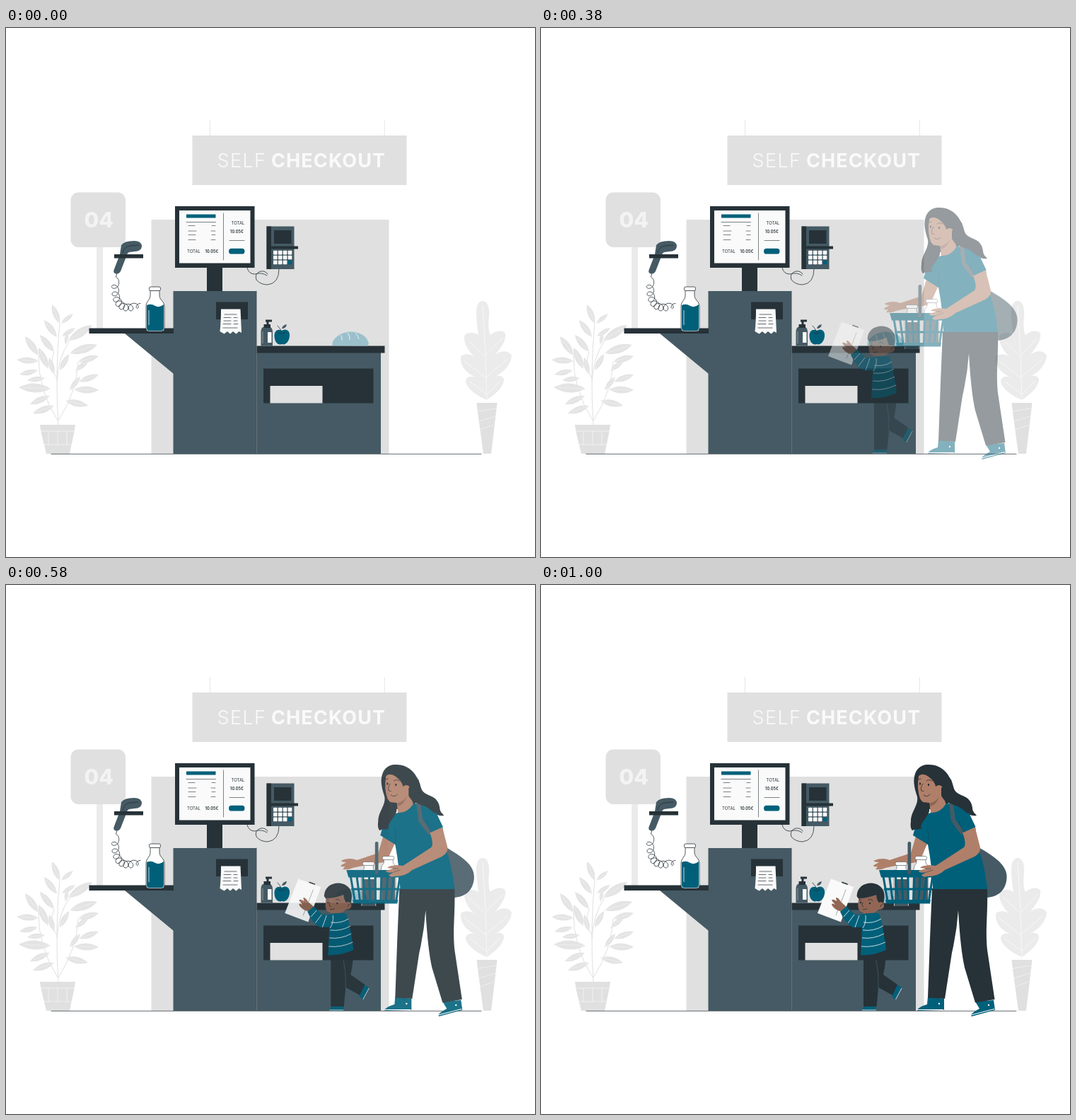
An HTML page that plays this animation: 748x748 px, repeating every 1.04 s.

```html
<!DOCTYPE html>
<html lang="en">
<head>
<meta charset="utf-8">
<title>Self checkout</title>
<style>
html, body { margin: 0; width: 100%; height: 100%; overflow: hidden; background: #fff; }
svg { display: block; width: 100vw; height: 100vh; }
text { font-family: Inter, "Open Sans", sans-serif; }
.dark { fill: #263238; }
.slate { fill: #455a64; }
.teal { fill: #00607a; }
.grey { fill: #e0e0e0; }
.pale { fill: #ebebeb; }
.leaf { fill: #e4e4e4; }
.white { fill: #fafafa; }
.skin { fill: #b07f69; }
.skin2 { fill: #916654; }
.line { fill: none; stroke: #263238; stroke-width: .8; stroke-linecap: round; }
.light { fill: none; stroke: #fafafa; stroke-width: .8; }
.outlined { fill: #fff; stroke: #263238; stroke-width: .8; }
.thick { fill: none; stroke: #00607a; stroke-width: 3; }
</style>
</head>
<body>
<svg viewBox="0 0 748 748">
  <!-- wall, hanging sign, lane sign -->
  <g class="grey">
    <rect x="205.5" y="271" width="336" height="331"/>
    <rect x="263.5" y="152" width="303" height="70"/>
    <path d="M288.2 130h.8v22h-.8zM534.8 130h.8v22h-.8z"/>
    <rect class="pale" x="128" y="309" width="9" height="116"/>
    <rect x="91.5" y="232.5" width="77.500" height="77.500" rx="11"/>
  </g>
  <g class="white">
    <text x="298.500" y="197" font-size="27" font-weight="300" letter-spacing="1.4">SELF</text>
    <text x="375" y="197" font-size="27" font-weight="700" letter-spacing="1.1">CHECKOUT</text>
    <text x="110.500" y="281.500" font-size="30" font-weight="800" opacity=".75">04</text>
  </g>

  <!-- plants -->
  <g id="bush"></g>
  <path class="grey" d="M48 561H98L96.500 571 90 602H57L49.500 571Z"/>
  <path class="light" d="M49 570H97M51 589H93M60 570v19M73 570v19M86 570v19" opacity=".8"/>
  <path class="pale" d="M674 386C681 386 684 395 683 407 682 420 682 428 685 434 691 428 703 426 706 432 708 443 697 455 692 462 700 455 711 456 715 463 714 477 703 487 692 493 698 490 705 493 704 499 701 511 690 519 680 526 668 521 653 512 650 500 650 493 658 491 665 494 652 489 642 479 643 465 646 460 656 460 663 465 655 459 647 447 648 435 653 429 664 431 668 434 666 422 665 410 665 401 665 393 668 386 674 386Z"/>
  <path class="light" d="M674 392Q679 460 680 530M679 462 702 438M677 464 653 441M680 493 709 468M679 495 648 471M680 518 698 500M680 518 656 500" stroke-width=".6"/>
  <path class="grey" d="M665.500 530H694.500L693 543 686 602H675L667 543Z"/>
  <path class="light" d="M667 542 693 538M669 556 692 549M670 568 690 561" opacity=".7"/>

  <path class="line" d="M64 602.400H672" style="stroke-width:.7"/>

  <!-- kiosk -->
  <rect class="slate" x="236.500" y="372" width="117.500" height="230"/>
  <path class="slate" d="M168 432H237V489Z"/>
  <rect class="dark" x="117.500" y="424.500" width="119.500" height="7.500"/>
  <path class="dark" d="M284 338h22v34h-22zM239 252h112.500v87H239z"/>
  <rect class="white" x="245" y="258" width="100.500" height="74.500"/>
  <rect class="teal" x="255" y="263.500" width="41.500" height="5"/>
  <rect class="teal" x="315" y="311.800" width="22.500" height="7.800" rx="3.900"/>
  <path class="line" d="M307.500 262V328M255 274.500H296.500M316 300.500H337M258 279.500h9M258 287h11M258 292.500h10M258 299.500h10M291 279.500h5M290 287h6M291 292.500h5M290 299.500h6" style="stroke-width:.6"/>
  <g class="dark" font-size="6">
    <text x="256" y="318">TOTAL</text>
    <text x="318.500" y="277.500">TOTAL</text>
    <g font-weight="600" font-size="5.700">
      <text x="281.500" y="318">10.05€</text>
      <text x="317" y="290">10.05€</text>
    </g>
  </g>
  <rect class="dark" x="297" y="387.500" width="45" height="24.500"/>
  <path class="white" d="M304 397.500H331.500L333 431 329.500 429 325.500 432.500 321 429 317 432.500 313 429 308.500 432.500 302.500 429Q304 415 304 397.500Z"/>
  <path class="line" d="M309 405H326M308 409.500H318M322 409.500h5M308 414H318M322 414h5M307 418.500H318M322 418.500h6M307 424H327" style="stroke-width:.7"/>

  <!-- counter -->
  <rect class="slate" x="354.500" y="459" width="175.500" height="143"/>
  <path class="line" d="M354.300 372V602" style="stroke-width:.5"/>
  <path class="dark" d="M354.500 449.500h181v10h-181zM364 481.500h155.500v49H364z"/>
  <rect class="grey" x="373.500" y="506" width="74" height="24.500"/>

  <!-- scanner -->
  <path id="coil" class="line"/>
  <path class="slate" d="M163 307Q167 301 181 301 192 301 192 309 191 316 182 316L174 317Q171 318 169 326L162 344Q159 349 154 347 151 345 153 341L161 320Z"/>
  <path class="line" d="M165 318Q167 309 175 308L187 307"/>
  <rect class="dark" x="153" y="320" width="41" height="5.500"/>

  <!-- milk bottle -->
  <path class="outlined" d="M204 371H217V378C217 385 224 386 224 394V425Q224 429 220 429H202Q198 429 198 425V394C198 386 204 385 204 378Z"/>
  <path class="teal" d="M199 392Q205 389 211 393 217 396 223 391V424Q223 428 219.500 428H202.500Q199 428 199 424Z"/>
  <rect class="outlined" x="202.500" y="366" width="16" height="5.500" rx="2"/>
  <path class="light" d="M202 399V420"/>

  <!-- card reader -->
  <path class="line" d="M341 339Q343 348 352 348 362 345 369 350M370 348Q367 343 360 344 351 347 354 356 360 363 370 363 386 361 386 341"/>
  <rect class="slate" x="368.500" y="280.500" width="39" height="60.500"/>
  <path class="dark" d="M368.500 280.500h6.500v60.500h-6.500zM379 286h24.500v19H379zM370 308.500h43v4h-43z"/>
  <g id="keys" class="white"></g>

  <!-- goods -->
  <path class="slate" d="M363 423H374Q377 425 377 430V449.500H360.500V430Q360.500 425 363 423Z"/>
  <path class="dark" d="M367 412.500H376V415.500H371.500V419H374V424H364.500V419H368.500V415.500H367Z"/>
  <path class="white" d="M370 430h5.500v15H370z"/>
  <path class="light" d="M363 429V446" opacity=".5"/>
  <path class="teal" d="M390 428C396 424 402 428 401 436 400 444 395 449 390 447 385 449 380 445 379.500 436 379 428 385 425 390 428Z"/>
  <path class="slate" d="M390 425Q391 420 397 419 396 425 390 425Z"/>
  <path class="line" d="M390 430Q388 425 384 421M385 431Q390 434 395 430"/>
  <path d="M461.500 449C460 442 468 434 478 431 490 427 503 431 509 438 514 445 514 449 509 449.500Z" fill="#9bc0cc"/>
  <path class="light" d="M473 434Q476 438 475 442M483 431Q487 436 486 441M494 431Q498 435 499 440"/>

  <g id="people">
    <!-- woman: bag, far arm, head -->
    <path class="slate" d="M619 371C641 384 660 396 658.500 415 657 433 645 441 630 442L622 420Z"/>
    <path class="skin" d="M531 352 523 379 493 389Q483 385 471 389.500 470 391.500 478 392L470 396.500Q470 399 476 398L473 402Q481 403 487 400L496 398 531 392Q536 390 539 382L548 362Z"/>
    <path class="dark" d="M547 254C560 253 572 261 577 271 584 280 582 290 590 300L570 312 545 318 533 302C529 291 525 278 529 267 532 258 539 254 547 254Z"/>
    <path class="skin" d="M549 304 551 324Q564 325 573 311L565 288Z"/>
    <path class="skin" d="M534 270Q531 288 536 302 540 311 550 308.500 559 307 563 298 570 293 567 285 563 281 558 285 557 278 548 271 540 265 534 270Z"/>
    <path d="M550 308.500Q558 307 563 299 560 310 551 313Z" fill="#8f6453"/>
    <path class="line" d="M540 281Q536 287 538 291L541 291.500M541 297Q546 301 550 296M533 275 537 274M545 277Q549 274 553 277"/>
    <g class="dark"><ellipse cx="536" cy="281" rx="1.200" ry="1.700"/><ellipse cx="548" cy="282.500" rx="1.200" ry="1.700"/></g>

    <!-- shoes, trousers -->
    <path class="teal" d="M547 582 570 585V601L532 602Q532 597 546 593ZM614 589 640 587 642 601 609 610Q605 607 620 599Z"/>
    <path class="light" d="M532 600.500H569M608 608 641 599.500" style="stroke-width:1.200"/>
    <g class="white"><circle cx="563" cy="592" r="1.200"/><circle cx="633" cy="594" r="1.200"/></g>
    <path class="dark" d="M553 429H631C632 465 628 490 631 516L641.500 586 614 590.500 599 541Q593 515 590 460 588 490 581 520L571 585 547 583.500 550 500Z"/>

    <!-- shirt, strap, loose hair -->
    <path class="teal" d="M551 322Q564 323 573 309C590 309 601 315 605 323L614 342 618 371Q628 398 631 430H554Q553 398 547 367L526 354Q532 330 539 326Z"/>
    <path class="slate" d="M577 309 583 310 586 332 600 350 594 353 580 334Z"/>
    <path class="line" d="M598 350Q592 341 591 334M547 366Q549 355 547 345" style="stroke-width:.4"/>
    <path class="dark" d="M532 299C534 312 523 320 523 334 522 341 523 345 525 347 530 344 534 347 538 344 535 337 546 330 549 320L549 308 540 307ZM566 287 580 275C582 286 584 293 594 297 606 301 609 308 610 315 610 321 614 323 616 326 606 328 600 320 593 315 584 309 573 311 566 298Z"/>

    <!-- bottles and basket -->
    <g id="flask">
      <path class="outlined" d="M531 388H544V393Q548 397 548 402V446H527V402Q527 397 531 393Z" style="stroke-width:.5"/>
      <path class="slate" d="M528 408H547V446H528Z"/>
      <rect class="outlined" x="529" y="383.500" width="16.500" height="5" rx="2" style="stroke-width:.5"/>
    </g>
    <use href="#flask" x="-28" y="8"/>
    <path class="teal" d="M478 403H556.500L555.500 413.500H481Z"/>
    <path id="bars" class="thick"/>
    <path class="teal" d="M487 445H551L550 450.500H488Z"/>
    <rect class="slate" x="518.500" y="363" width="4.700" height="46" rx="2"/>

    <!-- near arm -->
    <path class="skin" d="M596 350 613.500 342 621 371Q622 379 613 384L571 403Q562 412 546 412 540 414 538 410L545 406Q534 408 534 404L544 401 536 400Q537 397 549 396L558 397 598 371Q602 366 596 350Z"/>
    <path class="teal" d="M593 325 605 322 614.500 342 597 350Z"/>
    <path class="line" d="M545 406 554 403M544 401H551" style="stroke-width:.5"/>

    <!-- child -->
    <path class="skin2" d="M456 459H472V470H456Z"/>
    <path class="teal" d="M454 602Q454 597 459 595H474V602ZM503 565 510 569 501 586.500 496 581Z"/>
    <path class="light" d="M454 601H474M510 570 501.500 586"/>
    <path class="dark" d="M456 520 487.500 515Q488 535 484 551L504 565 497 580 477 569 474.500 596H456Z"/>
    <path class="line" d="M474 531Q478 550 477 569" style="stroke:#455a64"/>
    <path class="white" d="M410 415.500 442 427 424 476.500 391 464Z"/>
    <path class="line" d="M426 420.500 433 423" style="stroke-width:1.800"/>
    <path class="line" d="M431 431 417 467" style="stroke-width:.4"/>
    <path class="skin2" d="M425 462Q414 459 411 452 411 449 416 452L411 446Q412 443 418 447L417 442Q420 441 424 448L433 456Z"/>
    <path class="teal" d="M453 466Q466 461 478 465 483 478 488 516 471 524 452 523.500L454 484 441 484Q430 479 423 462L432 454.500 444 466Z"/>
    <path class="light" d="M428 469 436 460M434 478 443 466M444 484 450 467M455 485Q460 478 459 467M456 477Q470 479 481 472M455 488Q470 490 484 482M454 499Q470 501 485 493M453 511Q470 513 487 505"/>
    <path class="dark" d="M446.500 440C447 427 457 421 468 421.500 482 423 488 434 485 446 484 454 481 457 477 459L452 448Z"/>
    <path class="skin2" d="M449.500 443Q447 454 450 460 454 465 465 464 473 464 477 459 486 459 485 451 482 447 478 449 475 447 474 438 461 443 449.500 443Z"/>
    <path class="line" d="M455 449Q452 454 456 455M455 459 461 458M450 445 453 445M463 445Q466 443 469 446M480 455Q481 451 483 451"/>
    <g class="dark"><circle cx="452" cy="449" r="1.200"/><circle cx="465" cy="450" r="1.200"/></g>
  </g>
</svg>
<script>
const $ = id => document.getElementById(id);

// Bush: a stem, then leaves as base x, y and tip x, y
const leaves = [
  [76,418,65,391], [78,418,95,404], [72,437,54,413], [79,436,98,424], [88,442,122,420],
  [68,458,48,434], [90,460,129,448], [84,448,87,430], [46,463,27,436], [46,471,15,469],
  [102,472,131,464], [45,484,19,490], [55,495,30,498], [98,485,117,470], [103,500,131,490],
  [63,510,18,508], [90,512,105,493], [96,511,131,512], [62,520,34,532], [68,534,38,545],
  [84,527,116,534], [68,490,61,466], [76,484,89,461], [60,482,46,452]
];
const leaf = ([x, y, u, v]) => {
  const dx = (u - x) * .5, dy = (v - y) * .5, k = .58;
  const mx = x + dx, my = y + dy;
  return `<path class="leaf" d="M${x} ${y}Q${mx - dy * k} ${my + dx * k} ${u} ${v}Q${mx + dy * k} ${my - dx * k} ${x} ${y}"/>
    <path class="light" style="stroke-width:.4" d="M${x} ${y}L${x + dx * 1.7} ${y + dy * 1.7}"/>`;
};
$("bush").innerHTML = `<path d="M74 561Q69 490 76 416M73 555Q45 510 46 463M74 555Q100 515 102 472M72 500Q74 465 90 442M72 495Q60 480 68 458"
  fill="none" stroke="#e0e0e0"/>` + leaves.map(leaf).join("");

// Scanner cord: loops running along a curve
let cord = "M157 347";
for (let i = 0; i <= 160; i++) {
  const s = i / 160, a = s * 2 * Math.PI * 8 - 1.5, r = 5 * Math.min(1, 6 * (1 - s) + .3);
  const x = 155 * (1 - s) ** 2 + 300 * s * (1 - s) + 190 * s * s;
  const y = 357 * (1 - s) ** 2 + 816 * s * (1 - s) + 391 * s * s;
  cord += `L${(x + r * Math.cos(a)).toFixed(1)} ${(y + r * Math.sin(a)).toFixed(1)}`;
}
$("coil").setAttribute("d", cord);

// Keypad
for (let i = 0; i < 12; i++) {
  const x = 378 + i % 4 * 6.9, y = 314.800 + (i >> 2) * 6.9;
  $("keys").innerHTML += `<rect x="${x}" y="${y}" width="5.600" height="5.600" rx=".8" ${i == 11 ? 'class="teal"' : ""}/>`;
}

// Basket bars lean towards the middle
let bars = "M485 430H553";
for (let i = 0; i < 9; i++) bars += `M${484 + i * 8.7} 412L${490 + i * 7.300} 447`;
$("bars").setAttribute("d", bars);

// cubic-bezier(.36, -.01, .5, 1.38), which overshoots before it settles
const bezier = (a, b, u) => 3 * a * u * (1 - u) ** 2 + 3 * b * u * u * (1 - u) + u ** 3;
function ease(x) {
  let lo = 0, hi = 1;
  for (let i = 0; i < 30; i++) {
    const mid = (lo + hi) / 2;
    if (bezier(.36, .5, mid) < x) lo = mid; else hi = mid;
  }
  return bezier(-.01, 1.38, hi);
}

const LOOP = 1040, STEPS = 25, TRAVEL = 29;
function draw(now) {
  const step = Math.min(STEPS - 1, Math.floor((now % LOOP + 4) / LOOP * STEPS));
  const p = step < 3 ? 0 : ease(step / (STEPS - 1));
  $("people").setAttribute("transform", `translate(${TRAVEL * (1 - p)} 0)`);
  $("people").setAttribute("opacity", Math.max(0, Math.min(1, p)));
}
let start;
function tick(now) {
  start ??= now;
  draw(now - start);
  requestAnimationFrame(tick);
}
draw(0);
requestAnimationFrame(tick);
</script>
</body>
</html>
```
